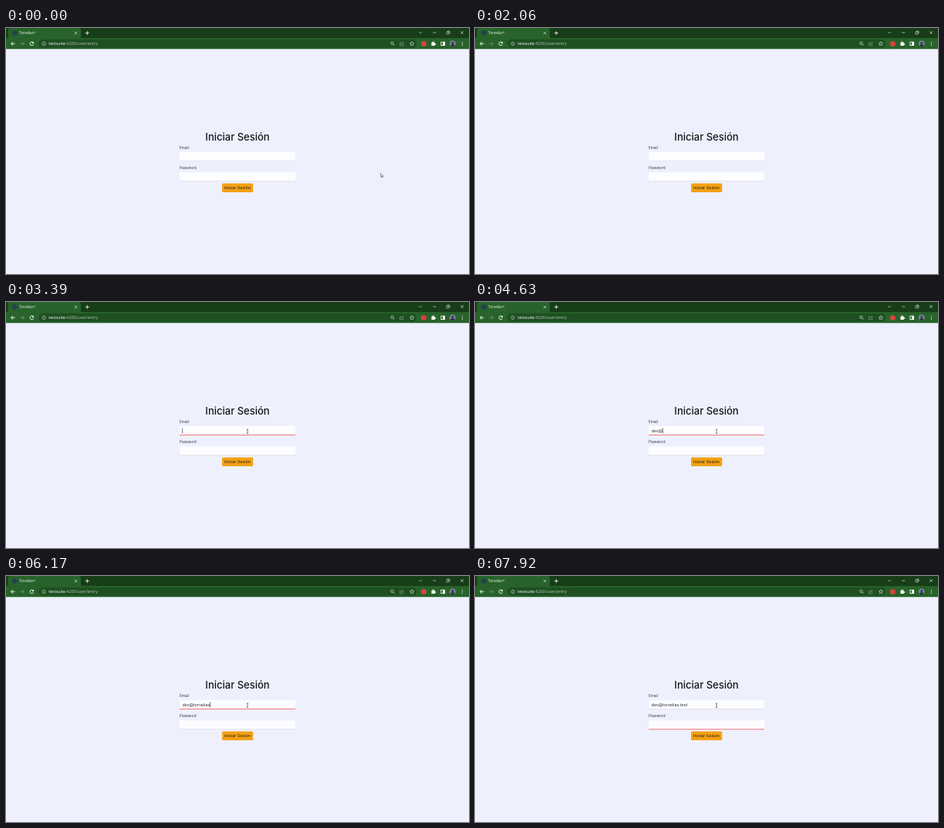
These frames come from a looping animation (600x319 px, 8000 ms). An HTML page with a canvas:

```html
<!DOCTYPE html>
<html lang="es">
<head>
<meta charset="utf-8">
<title>Iniciar Sesión</title>
<style>
html, body { margin: 0; width: 100%; height: 100%; overflow: hidden; background: #eef1fd; }
canvas { display: block; width: 100vw; height: 100vh; }
</style>
</head>
<body>
<canvas id="stage"></canvas>
<script>
const W = 600, H = 319, LOOP = 8000;
const UI = '"Open Sans", "Noto Sans", sans-serif';
const PAGE = 'Inter, Roboto, sans-serif';
const EMAIL = 'dev@torvelias.test';
const CLICK = 3190, TAB = 7230, BLINK = 530;

const canvas = document.getElementById('stage');
const ctx = canvas.getContext('2d');

function resize() {
  const dpr = window.devicePixelRatio || 1;
  canvas.width = Math.round(innerWidth * dpr);
  canvas.height = Math.round(innerHeight * dpr);
}
addEventListener('resize', resize);
resize();

function rect(x, y, w, h, color, radius = 0) {
  ctx.fillStyle = color;
  ctx.beginPath();
  ctx.roundRect(x, y, w, h, radius);
  ctx.fill();
}

function disc(x, y, r, color) {
  ctx.fillStyle = color;
  ctx.beginPath();
  ctx.arc(x, y, r, 0, Math.PI * 2);
  ctx.fill();
}

function ring(x, y, r, color, width = 0.7, from = 0, to = Math.PI * 2) {
  ctx.strokeStyle = color;
  ctx.lineWidth = width;
  ctx.beginPath();
  ctx.arc(x, y, r, from, to);
  ctx.stroke();
}

function path(d, x, y, stroke, width = 0.8, fill) {
  const p = new Path2D(d);
  ctx.save();
  ctx.translate(x, y);
  if (fill) { ctx.fillStyle = fill; ctx.fill(p); }
  if (stroke) { ctx.strokeStyle = stroke; ctx.lineWidth = width; ctx.stroke(p); }
  ctx.restore();
}

function text(str, x, y, size, color, family = PAGE, weight = 400, align = 'left') {
  ctx.font = `${weight} ${size}px ${family}`;
  ctx.textAlign = align;
  ctx.fillStyle = color;
  ctx.fillText(str, x, y);
  return ctx.measureText(str).width;
}

const CROSS = 'M-1.7-1.7L1.7 1.7M1.7-1.7L-1.7 1.7';
const ARROW = 'M2.6 0H-2.4M0-2.5L-2.5 0L0 2.5';

function star(x, y, r) {
  let d = '';
  for (let i = 0; i < 10; i++) {
    const a = i * Math.PI / 5 - Math.PI / 2, k = i % 2 ? r * 0.45 : r;
    d += (i ? 'L' : 'M') + Math.cos(a) * k + ' ' + Math.sin(a) * k;
  }
  path(d + 'Z', x, y, '#dbe8db', 0.6);
}

function drawTabs() {
  rect(0, 0, W, 13, '#173d19');
  rect(2.5, 0, 94.5, 16, '#27632a', [2.5, 2.5, 0, 0]);
  disc(11.3, 6.5, 3.3, '#263f4c');
  text('Torvelias+', 17, 8.2, 4.6, '#f2f7f2', UI);
  path(CROSS, 90.5, 6.5, '#f2f7f2', 0.7);
  path('M-2.5 0H2.5M0-2.5V2.5', 105.3, 6.5, '#fff', 0.8);
  path('M-2-1L0 1L2-1', 537, 6, '#c9d6c9', 0.6);
  path('M-2 0H2', 555.3, 6, '#fff', 0.6);
  path('M-2-1H1V2H-2ZM-1-1V-2H2V1H1', 573, 6, '#fff', 0.5);
  path(CROSS, 591, 6, '#fff', 0.6);
}

function drawAvatar(x, y) {
  disc(x, y, 4, '#77809a');
  disc(x, y - 0.8, 1.4, '#2d3040');
  path('M-2.8 2.8Q-2.4 0.8 0 0.8Q2.4 0.8 2.8 2.8Q0 5.2-2.8 2.8Z', x, y, null, 0, '#2d3040');
}

function drawToolbar() {
  rect(0, 12.9, W, 14.3, '#27632a');
  rect(42, 14.8, 490, 10.8, '#1e4f22', 5.4);
  path(ARROW, 9, 20.3, '#fff', 0.9);
  ctx.save();
  ctx.scale(-1, 1);
  path(ARROW, -21, 20.3, '#74a076', 0.8);
  ctx.restore();
  ring(33.4, 20.3, 2.3, '#fff', 0.9, 0.3, 5.5);
  path('M0 0H-2.5L0-2.5Z', 36, 20, null, 0, '#fff');

  ring(49, 20.3, 2.3, '#c4d6c4', 0.6);
  path('M0-0.3V1.3M0-1.4V-0.8', 49, 20.3, '#c4d6c4', 0.6);
  const w = text('testsuite', 55.3, 22.3, 5.4, '#fff', UI);
  text(':4200/user/entry', 55.3 + w, 22.3, 5.4, '#b3c8b4', UI);

  ring(500.4, 19.7, 1.7, '#dbe8db');
  path('M0 0L1.8 1.8', 501.6, 20.9, '#dbe8db', 0.8);
  path('M-1-1.4H-2.4V2.3H2V1M-1 1Q-0.8-1.2 1.7-1.2M0.7-2.5L2.2-1.2L0.7 0', 513, 20.5, '#8fb091', 0.6);
  star(526, 20.4, 2.9);

  disc(541.4, 20.4, 3.5, '#d3453f');
  path('M-2.4-1.4H-0.8A0.9 0.9 0 1 1 0.8-1.4H2V0A0.9 0.9 0 1 1 2 1.6V2.8H-2.4V1.4A0.8 0.8 0 0 0-2.4 0Z',
    553.7, 20.2, null, 0, '#fff');
  rect(563.4, 17.7, 5.6, 5.2, '#fff', 0.5);
  rect(564.2, 18.6, 2, 3.5, '#27632a');
  drawAvatar(578.8, 20.2);
  for (let i = -1; i < 2; i++) disc(591.3, 20.3 + i * 2, 0.6, '#fff');
}

function field(label, y, value, focused, caret) {
  text(label, 225, y - 3.8, 4.7, '#35373f');
  rect(225, y, 150, 11, '#fdfdff', 0.5);
  rect(225, y + 11, 150, 1, focused ? '#f0757a' : '#e2e4ed');
  const w = text(value, 228.5, y + 7.7, 5.35, '#2a2c33');
  if (caret) rect(228.5 + w, y + 2.5, 0.6, 7, '#222');
}

// Time at which the i-th character of the address is typed
function keyTime(i) {
  if (i < 3) return 4010 + i * 105;
  if (i === 3) return 4420;
  if (i < 13) return 4760 + (i - 4) * 165;
  return 6380 + (i - 13) * 130;
}

function drawForm(t) {
  let typed = 0, last = CLICK;
  while (typed < EMAIL.length && t >= keyTime(typed)) last = keyTime(typed++);
  if (t >= TAB) last = TAB;
  const lit = Math.floor((t - last) / BLINK) % 2 === 0;
  const first = t >= CLICK && t < TAB, second = t >= TAB;

  text('Iniciar Sesión', 300, 145.7, 13, '#15161a', PAGE, 500, 'center');
  field('Email', 161, EMAIL.slice(0, typed), first, first && lit);
  field('Password', 187.2, '', second, second && lit);
  rect(280, 201.6, 40.2, 11.5, '#f3a115', 1.5);
  text('Iniciar Sesión', 300, 209.2, 5.35, '#1e1a10', PAGE, 400, 'center');
}

// Cubic Bezier point, k from 0 to 1
function bezier(a, b, c, d, k) {
  const m = 1 - k;
  return [0, 1].map(i =>
    m * m * m * a[i] + 3 * m * m * k * b[i] + 3 * m * k * k * c[i] + k * k * k * d[i]);
}

function pointer(t) {
  if (t < 620) return [485.6, 188.6];
  if (t < 1080) {
    const k = (t - 620) / 460;
    return bezier([485.6, 188.6], [497, 215], [521, 270], [545, 325], k * k);
  }
  if (t < 2220) return null;
  const k = Math.min(1, (t - 2220) / 830);
  return bezier([505, 322], [455, 265], [350, 195], [313, 167.7], 1 - (1 - k) ** 2);
}

function drawPointer(t) {
  const p = pointer(t);
  if (!p) return;
  const [x, y] = p;
  if (x > 225 && x < 375 && y > 161 && y < 172.5) {
    path('M-1.2-2.8Q0-2.8 0-2V2Q0 2.8-1.2 2.8M1.2-2.8Q0-2.8 0-2M0 2Q0 2.8 1.2 2.8', x, y, '#222', 0.6);
  } else {
    path('M0 0V4.6L1.1 3.7L1.9 5.4L2.7 5L1.9 3.4H3.3Z', x, y, '#222', 0.5, '#fff');
  }
}

function frame(now) {
  const t = now % LOOP;
  ctx.setTransform(canvas.width / W, 0, 0, canvas.height / H, 0, 0);
  rect(0, 0, W, H, '#eef1fd');
  drawTabs();
  drawToolbar();
  drawForm(t);
  drawPointer(t);
}

const start = performance.now();
function tick() {
  frame(performance.now() - start);
  requestAnimationFrame(tick);
}
tick();
</script>
</body>
</html>
```
